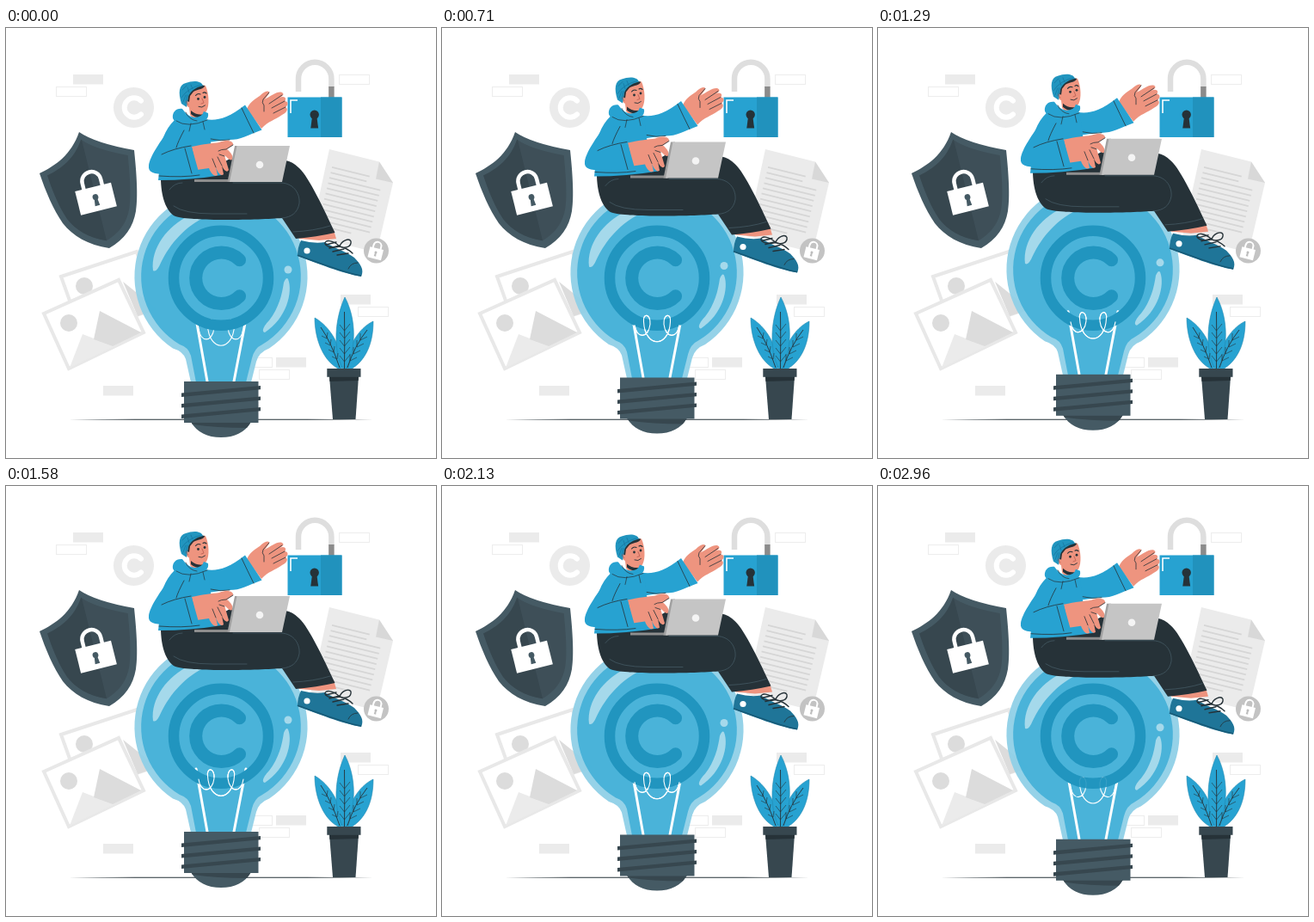
An HTML page with a canvas that plays this animation: 500 px wide and 500 px high, repeating every 3000 ms.

```html
<!DOCTYPE html>
<html lang="en">
<head>
<meta charset="utf-8">
<title>Protected ideas</title>
<style>
html, body { margin: 0; width: 100%; height: 100%; overflow: hidden; background: #fff; }
canvas { display: block; width: 500px; height: 500px; }
</style>
</head>
<body>
<canvas id="stage"></canvas>
<script>
const LOOP = 3000, RISE = 9.5;
const BLUE = '#27a2d1', DEEP = '#2195bf', GLASS = '#46b1d8', HALO = '#90d0e7', SHINE = '#a5d9eb';
const INK = '#263238', SLATE = '#37474f', STEEL = '#455a64', SKIN = '#ee947f';
const PALE = '#ebebeb', GREY = '#dcdcdc';

const canvas = document.getElementById('stage');
const ctx = canvas.getContext('2d');
const dpr = window.devicePixelRatio || 1;
canvas.width = canvas.height = 500 * dpr;

const cache = {};
const path = d => cache[d] || (cache[d] = new Path2D(d));

function fill(color, d) {
  ctx.fillStyle = color;
  ctx.fill(path(d));
}

function line(color, width, d) {
  ctx.strokeStyle = color;
  ctx.lineWidth = width;
  ctx.stroke(path(d));
}

function dot(color, x, y, r) {
  ctx.fillStyle = color;
  ctx.beginPath();
  ctx.arc(x, y, r, 0, Math.PI * 2);
  ctx.fill();
}

function arc(color, width, x, y, r, from = 0, to = 360) {
  ctx.strokeStyle = color;
  ctx.lineWidth = width;
  ctx.beginPath();
  ctx.arc(x, y, r, from * Math.PI / 180, to * Math.PI / 180);
  ctx.stroke();
}

function rect(color, x, y, w, h) {
  ctx.fillStyle = color;
  ctx.fillRect(x, y, w, h);
}

function at(x, y, deg, draw, scale = 1) {
  ctx.save();
  ctx.translate(x, y);
  ctx.rotate(deg * Math.PI / 180);
  ctx.scale(scale, scale);
  draw();
  ctx.restore();
}

function keyhole(color, x, y, r) {
  dot(color, x, y, r);
  fill(color, `M${x - r * .45} ${y} L${x - r * .85} ${y + r * 3} H${x + r * .85} L${x + r * .45} ${y}Z`);
}

function boxes() {
  [[78, 54], [389, 310], [314, 383], [113, 416]].forEach(([x, y]) => rect(PALE, x, y, 35, 11.5));
  ctx.strokeStyle = '#ededed';
  ctx.lineWidth = 1;
  [[58.5, 68.5], [387.5, 54.5], [409.5, 324.5], [274.5, 383.5], [294.5, 397.5]]
    .forEach(([x, y]) => ctx.strokeRect(x, y, 35, 11));
}

function shield() {
  const shape = 'M85 121 Q104 134 149 142 C153 180 153 200 151 213 C148 231 138 246 120 256 C95 252 78 242 66 227 C55 211 46 190 39 169 C58 160 76 147 85 121Z';
  fill(STEEL, shape);
  ctx.save();
  ctx.translate(100, 188);
  ctx.scale(.85, .87);
  ctx.translate(-100, -188);
  fill('#3e4f58', shape);
  ctx.clip(path(shape));
  fill(SLATE, 'M85 118 L121 260 H30 V118Z');
  ctx.restore();
  at(104.5, 198.5, -14, () => {
    line('#fff', 4.5, 'M-11 -12 V-21 A11 11 0 0 1 11 -21 V-12');
    rect('#fff', -21.5, -14, 43, 28.5);
    keyhole(STEEL, 0, -2, 3.4);
  });
}

function page() {
  fill(PALE, 'M376 141 L434 155.5 L450 180 L431 261 L354 242Z');
  fill('#d8d8d8', 'M434 155.5 L450 180 L430 175.5Z');
  at(379, 162, 13.8, () => {
    for (let i = 0; i < 12; i++) {
      const w = i < 2 ? 45 - i * 2 : i === 11 ? 40 : 61;
      rect('#d6d6d6', 0, i * 6.3 - 1, w, 1.8);
    }
  });
  dot('#c3c3c3', 430.5, 259, 14.5);
  at(430, 261, 14, () => {
    line('#fff', 2, 'M-4.5 -4 V-8 A4.5 4.5 0 0 1 4.5 -8 V-4');
    rect('#fff', -8, -5, 16, 12.5);
    keyhole('#bdbdbd', 0, 0, 1.5);
  });
}

function photos() {
  line('#e8e8e8', 4, 'M64 289 L152 260 L175 326 L88 356Z');
  dot(GREY, 91, 300, 10);
  fill(GREY, 'M136 295 L176 327 L153 335Z');
  fill('#fff', 'M44 332 L131 293 L160 354 L73 396Z');
  line('#e8e8e8', 4, 'M44 332 L131 293 L160 354 L73 396Z');
  dot(GREY, 73, 343, 10);
  fill(PALE, 'M89 356 L126 370 L74 395Z');
  fill(GREY, 'M109 329 L157 354 L124 370 L102 362Z');
}

function padlock() {
  line('#dedede', 6.5, 'M340 74 V59 A19.2 19.2 0 0 1 378.4 59 V69');
  line('#8b8b8b', 6.5, 'M378.4 68 V81');
  rect(BLUE, 327.5, 80.5, 63, 46.5);
  rect('#2192bd', 366, 80.5, 24.5, 46.5);
  line('#fff', 1.6, 'M331 99 V84 H339');
  keyhole(INK, 358.7, 100.8, 5.2);
}

function plant() {
  const leaves = [
    'M388 397 C369 388 359 362 359 337 C377 347 391 371 391 395Z',
    'M395 397 C396 371 410 349 427 341 C427 366 419 386 401 397Z',
    'M392 397 C380 373 382 339 394 313 C408 339 407 374 395 397Z'
  ];
  leaves.forEach(d => { fill(BLUE, d); line('#2189b1', .6, d); });
  line(INK, .9, 'M393.5 396 Q394 360 393.5 330 M388 395 Q378 365 366 348 M397 395 Q405 370 420 351');
  for (let i = 0; i < 5; i++) {
    const y = 345 + i * 9;
    line(INK, .6, `M393.5 ${y + 7} L388 ${y} M393.5 ${y + 7} L400 ${y - 1}`);
    if (i < 4) line(INK, .6, `M${373 + i * 4} ${361 + i * 8} l-6 -3 m6 3 l1 -7 M${412 - i * 4} ${363 + i * 8} l0 -8 m0 8 l8 -4`);
  }
  fill(SLATE, 'M376 405 H410 L406.5 455 H380Z');
  fill(INK, 'M376 405 H410 L409.6 410 L376.5 411Z');
  rect(SLATE, 373.3, 396, 39.2, 9.8);
}

function wires() {
  line('#fff', 1.1, 'M224 350 C226 366 240 366 242 349 C243 336 233 336 234.5 346 C236 377 264 377 265.5 346 C267 336 257 336 258 349 C260 366 274 366 276 350');
}

function bulb() {
  ctx.globalAlpha = .95;
  fill(HALO, 'M250 188.5 A100.5 100.5 0 0 1 306 372.5 Q294 377 291 388 L285 412 H215 L209 385 Q206 376 194 372.5 A100.5 100.5 0 0 1 250 188.5Z');
  fill(GLASS, 'M250 197 A92 92 0 0 1 298 368 Q289 372 286 384 L279 412 H221 L215 381 Q212 371 202 368 A92 92 0 0 1 250 197Z');
  ctx.globalAlpha = 1;
  fill(SHINE, 'M171 282 C168 256 188 230 213 218 H235 C207 231 191 251 180 273 Q175 285 171 282Z');
  fill(SHINE, 'M328 292 C334 307 326 338 301 354 C296 353 301 345 306 340 C317 326 321 310 323 296 Q326 289 328 292Z');
  dot(SHINE, 328, 281, 4.5);
  line('#fff', 3, 'M221 338 L234 411 M279 338 L265 411');
  wires();
}

function socket() {
  fill(STEEL, 'M215 458 H285 C278 470 266 476 250 476 C234 476 222 470 215 458Z');
  fill(SLATE, 'M215 458 H285 L280 465 Q245 465 217 461Z');
  rect(STEEL, 207, 411, 86.5, 48);
  for (let i = 0; i < 3; i++) {
    const y = 416 + i * 12.5;
    fill(SLATE, `M204 ${y + 8.5} L296 ${y} V${y + 4.3} L204 ${y + 13}Z`);
  }
}

function badge() {
  arc(DEEP, 12.5, 250, 290.8, 55);
  arc(DEEP, 15, 250.5, 290.8, 29.8, 45, 315);
}

function legs() {
  fill(SKIN, 'M337 243 L381 235 L384 245 L364 247 L342 245Z');
  fill('#1f7598', 'M343 247 Q358 251 371 249 C379 255 396 260 405 267 C412 274 417 281 413 289 C393 286 360 273 339 265 Q339 255 343 247Z');
  line('#175a77', 1.6, 'M339.5 264.5 C362 272 394 285 412.5 288');
  line(INK, .8, 'M398 280 Q401 273 409 273');
  dot('#fff', 350, 259, 3.6);
  line(INK, 1.4, 'M372 252 l12 -3 M376 256 l12 -3 M380 260 l13 -3 M385 264 l13 -2');
  line(INK, 1.4, 'M388 254 C380 246 370 246 371 251 C374 256 383 255 388 254 C390 247 399 244 401 248 C402 254 395 257 388 254 M388 254 Q397 256 403 262');
  fill(INK, 'M180 174 C180 195 186 214 197 219 C215 225 295 223 321 221 L337 245 Q361 243 382.5 238 C370 211 352 173 341 163 Q333 155 325 154 L262 151 L225 172Z');
  line(STEEL, .8, 'M264 180 H320 C336 181 342 194 341 204 C339 215 332 220 321 221 M190 188 Q196 180 205 180 M195 207 Q207 216 240 216 H280 M334 237 Q358 236 377 230');
}

function head() {
  fill(SKIN, 'M212 85 L214 101 Q222 113 230 103 L229 94Z');
  fill(INK, 'M215 96 Q222 102 230 100 L229 104 Q220 105 215 100Z');
  fill(SKIN, 'M211 79 C215 70 226 66 232 67 C236 76 237 90 233 97 C228 103 219 100 214 93 C209 91 207 86 211 83Z');
  fill(INK, 'M211 85 L212 76 C217 68 226 65 231 67 C231 71 223 71 218 74 L214 79 L213 86Z');
  fill(DEEP, 'M204 88 C200 75 201 66 209 64 C217 61 227 61 229 67 C220 69 214 74 212 80 L210 92Z');
  line('#1877a0', .8, 'M204 81 Q211 70 227 66 M206 86 l3 -8 M209 87 l2 -9 M213 75 l-2 -6 M217 71 l-2 -5 M205 72 l5 -5');
  dot(INK, 223.5, 82.5, 1.4);
  dot(INK, 231, 80.5, 1.4);
  line(INK, 1.1, 'M220.5 78.5 Q223 75.5 226 77 M229 75.5 Q231 74 233 76');
  line('#b95b51', .8, 'M228 82 L230 87 L227 88');
  line(INK, .9, 'M224 91.5 Q228 93.5 231.5 90');
  line('#b95b51', .7, 'M210 85 q-1 3 2 4');
}

function man() {
  legs();
  // reaching arm
  fill(SKIN, 'M280 94 C285 84 291 82 295 79 C301 73 307 72 306 76 L301 83 C308 79 316 73 321 75 C324 77 322 79 318 81 C324 78 327 82 324 85 C328 85 329 89 325 92 C329 94 326 99 321 101 C313 107 305 108 297 117Z');
  line(INK, .8, 'M306 75 L299 83 Q297 87 300 90 L300 97 M321 78 L306 88 M324 85 L309 93 M325 92 L311 99');
  fill(BLUE, 'M231 106 C245 108 257 106 278 89.5 L297.5 118.5 C280 125 272 131 256 130 L235 133Z');
  line(INK, .8, 'M274 93 Q281 108 288 122 M238 129 Q249 132 260 130');
  // torso and hood
  fill(BLUE, 'M196 107 C202 103 222 104 235 108 L238 133 L251 171 Q215 177 177 177 L180 150 C178 134 185 118 196 107Z');
  line(INK, .8, 'M178 172 Q205 174 225 171');
  head();
  fill(BLUE, 'M205 94 C198 93 193 98 194 105 C197 112 207 114 213 112 L231 108 Q236 105 235 99 L230 97 Q228 104 219 104 Q211 103 205 94Z');
  line(INK, .7, 'M198 108 Q211 117 234 107 M209 98 Q213 107 222 108 M215 111 L213 120 M229 109 L231 118');
  // laptop and typing arm
  rect('#8e8e8e', 219, 176, 44, 3);
  fill(SKIN, 'M216 138 C230 135 240 134 248 133 C258 129 265 132 264 136 L257 141 C262 145 265 150 263 153 C260 155 257 150 254 148 L259 165 C257 169 253 165 251 160 L253 170 C250 173 246 168 244 162 L246 171 C241 174 237 166 236 163 L222 165Z');
  line(INK, .8, 'M264 136 L256 141 Q250 141 247 143 M254 149 L248 147 M251 160 L246 150 M244 162 L240 152');
  fill('#a0a0a0', 'M266 137 H271 L262 179 H257.5Z');
  fill('#c5c5c5', 'M268.5 137 H330 L321 179 H260Z');
  dot('#f4f4f4', 295, 159, 4.3);
  fill(BLUE, 'M192 115 C179 132 167 150 166 160 C165 168 172 170 186 170 L224.5 169 L215.5 137 L195 141 L207 122Z');
  line(INK, .8, 'M207 119 Q200 132 198 139 M181 147 Q195 140 215 137 M208 140 L216 169');
}

function draw(t) {
  const phase = t % LOOP / LOOP;
  const lift = RISE * (1 - Math.abs(2 * phase - 1));
  ctx.setTransform(dpr, 0, 0, dpr, 0, 0);
  ctx.lineCap = 'butt';
  ctx.lineJoin = 'miter';
  rect('#fff', 0, 0, 500, 500);
  boxes();
  dot(PALE, 148.5, 92.5, 23.5);
  ctx.lineCap = 'round';
  arc('#fff', 6, 149, 92.5, 11.3, 45, 315);
  ctx.lineCap = 'butt';
  shield();
  page();
  photos();
  padlock();
  fill(INK, 'M73 455.3 L150 454.7 H350 L427 455.3 L350 455.8 H150Z');
  plant();

  ctx.lineCap = ctx.lineJoin = 'round';
  at(0, -lift, 0, bulb);
  badge();
  at(0, -lift, 0, () => {
    ctx.globalAlpha = Math.min(1, lift / 2.5);
    wires();
    ctx.globalAlpha = 1;
    socket();
    man();
  });
}

const start = performance.now();
function tick() {
  draw(performance.now() - start);
  requestAnimationFrame(tick);
}
tick();
</script>
</body>
</html>
```
